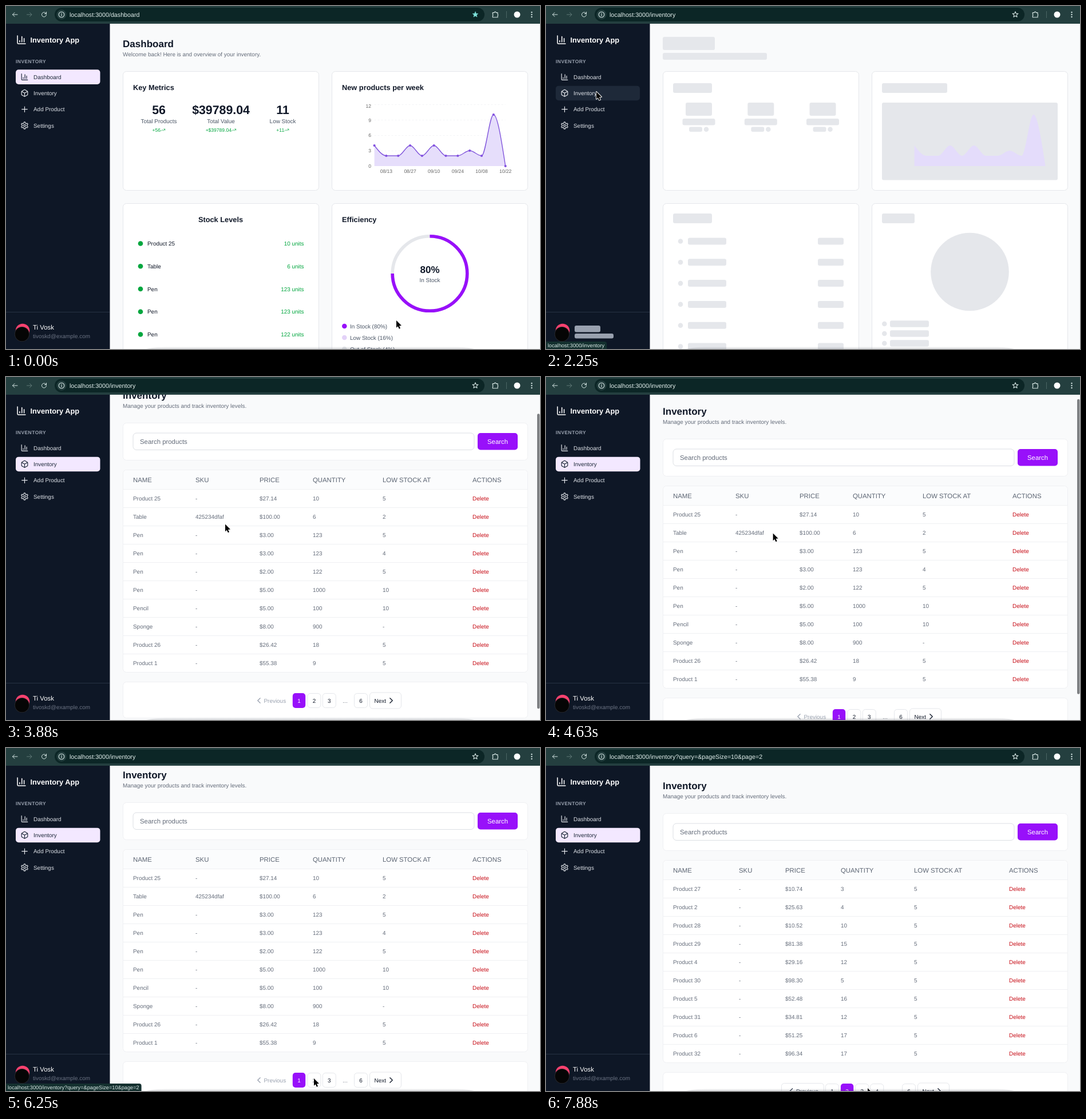
These frames come from a looping animation (933 px wide and 600 px high, 8 s). An HTML page with a canvas:

```html
<!DOCTYPE html>
<html lang="en">
<head>
<meta charset="utf-8">
<title>Inventory App</title>
<style>
html, body { margin: 0; width: 100%; height: 100%; overflow: hidden; background: #f9fafb; }
canvas { display: block; width: 933px; height: 600px; }
</style>
</head>
<body>
<canvas id="stage"></canvas>
<script>
const W = 933, H = 600, LOOP = 8000, STEP = 125;
const canvas = document.getElementById('stage');
const g = canvas.getContext('2d');
const dpr = window.devicePixelRatio || 1;
canvas.width = W * dpr;
canvas.height = H * dpr;
g.textRendering = 'geometricPrecision';

const INK = '#101828', GRAY = '#646c7a', LINE = '#e5e7eb', FAINT = '#eff0f3', BONE = '#e5e7eb';
const PURPLE = '#9810fa', GREEN = '#00a63e', RED = '#c60a14';
const SM = 9.94, XS = 8.52, MD = 11.36, LG = 12.8, XL = 17.05, XXL = 21.3;

// Moments of hard changes, in ms
const T = { hover: 1250, status: 1375, load: 1750, list: 2625, leave: 2750,
  link: 6250, page2: 6750, unlink: 7500 };

const pointer = [[0, 682, 550], [125, 575, 362], [250, 473, 213], [375, 473, 213],
  [1250, 88, 150], [2625, 88, 150], [3125, 368, 225], [3875, 383, 257.5], [4500, 392, 266],
  [5500, 500, 439], [6250, 538, 578], [6750, 541, 578], [7000, 547, 576],
  [7500, 547, 576], [7875, 562, 595]];
const scrollKeys = [[3250, 0], [3875, 34], [4125, 34], [4750, 3], [5375, 19], [6750, 19], [6751, 0]];

const ICONS = {
  chart: new Path2D('M3 3v16a2 2 0 0 0 2 2h16M18 17V9M13 17V5M8 17v-3'),
  box: new Path2D('M21 8a2 2 0 0 0-1-1.73l-7-4a2 2 0 0 0-2 0l-7 4A2 2 0 0 0 3 8v8a2 2 0 0 0 1 1.73l7 4a2 2 0 0 0 2 0l7-4A2 2 0 0 0 21 16ZM3.3 7l8.7 5 8.7-5M12 22V12'),
  plus: new Path2D('M4 12h16M12 4v16'),
  gear: gearPath(),
  trend: new Path2D('M22 7l-8.5 8.5-5-5L2 17M16 7h6v6'),
  left: new Path2D('M15 4l-8 8 8 8'),
  right: new Path2D('M9 4l8 8-8 8'),
  back: new Path2D('M21 12H4M11 5l-7 7 7 7'),
  forward: new Path2D('M3 12h17M13 5l7 7-7 7'),
  reload: new Path2D('M20 12a8 8 0 1 1-2.5-5.8L20 9M20 3v6h-6'),
  puzzle: new Path2D('M4 7h5a2.5 2.5 0 0 1 5 0h5v5a2.5 2.5 0 0 1 0 4v5H4v-5a2.5 2.5 0 0 0 0-4z'),
  star: starPath()
};
const NAV = [['Dashboard', 'chart'], ['Inventory', 'box'], ['Add Product', 'plus'], ['Settings', 'gear']];

const HEAD = ['NAME', 'SKU', 'PRICE', 'QUANTITY', 'LOW STOCK AT', 'ACTIONS'];
const PAGES = [
  { cols: [222, 331, 443, 536, 658, 815],
    rows: ['Product 25|-|$27.14|10|5', 'Table|425234dfaf|$100.00|6|2', 'Pen|-|$3.00|123|5',
      'Pen|-|$3.00|123|4', 'Pen|-|$2.00|122|5', 'Pen|-|$5.00|1000|10', 'Pencil|-|$5.00|100|10',
      'Sponge|-|$8.00|900|-', 'Product 26|-|$26.42|18|5', 'Product 1|-|$55.38|9|5'] },
  { cols: [222, 337, 418, 515, 643, 809],
    rows: ['Product 27|-|$10.74|3|5', 'Product 2|-|$25.63|4|5', 'Product 28|-|$10.52|10|5',
      'Product 29|-|$81.38|15|5', 'Product 4|-|$29.16|12|5', 'Product 30|-|$98.30|5|5',
      'Product 5|-|$52.48|16|5', 'Product 31|-|$34.81|12|5', 'Product 6|-|$51.25|17|5',
      'Product 32|-|$96.34|17|5'] }
];

function gearPath() {
  const p = new Path2D();
  for (let i = 0; i <= 96; i++) {
    const a = i / 96 * Math.PI * 2;
    const r = 8.7 + 1.7 * Math.tanh(2 * Math.cos(6 * a));
    p.lineTo(12 + r * Math.sin(a), 12 - r * Math.cos(a));
  }
  p.closePath();
  p.moveTo(15, 12);
  p.arc(12, 12, 3, 0, Math.PI * 2);
  return p;
}

function starPath() {
  const p = new Path2D();
  for (let i = 0; i < 10; i++) {
    const a = i * Math.PI / 5, r = i % 2 ? 4.4 : 10;
    p.lineTo(12 + r * Math.sin(a), 12 - r * Math.cos(a));
  }
  p.closePath();
  return p;
}

function track(keys, t) {
  if (t <= keys[0][0]) return keys[0].slice(1);
  for (let i = 1; i < keys.length; i++) {
    const a = keys[i - 1], b = keys[i];
    if (t <= b[0]) {
      const u = (t - a[0]) / (b[0] - a[0]), e = u * u * (3 - 2 * u);
      return a.slice(1).map((v, k) => v + (b[k + 1] - v) * e);
    }
  }
  return keys[keys.length - 1].slice(1);
}

// y is the middle of the capitals
function text(s, x, y, size, color, { bold = false, align = 'left', gap = 0 } = {}) {
  g.font = (bold ? 'bold ' : '') + size + 'px "Liberation Sans", Arial, sans-serif';
  g.textAlign = align;
  g.letterSpacing = gap + 'px';
  g.fillStyle = color;
  g.fillText(s, x, y + size * 0.355);
}

function rect(x, y, w, h, r, fill, stroke) {
  g.beginPath();
  g.roundRect(x, y, w, h, r);
  if (fill) { g.fillStyle = fill; g.fill(); }
  if (stroke) { g.strokeStyle = stroke; g.lineWidth = 1; g.stroke(); }
}

function dot(x, y, r, fill) {
  g.beginPath();
  g.arc(x, y, r, 0, Math.PI * 2);
  g.fillStyle = fill;
  g.fill();
}

function line(x1, y1, x2, y2, color, width = 1) {
  g.beginPath();
  g.moveTo(x1, y1);
  g.lineTo(x2, y2);
  g.strokeStyle = color;
  g.lineWidth = width;
  g.stroke();
}

function icon(name, cx, cy, size, color, { weight = 2, filled = false } = {}) {
  g.save();
  g.translate(cx - size / 2, cy - size / 2);
  g.scale(size / 24, size / 24);
  g.lineWidth = weight;
  g.lineCap = g.lineJoin = 'round';
  g.strokeStyle = g.fillStyle = color;
  if (filled) g.fill(ICONS[name]);
  g.stroke(ICONS[name]);
  g.restore();
}

const card = (x, y, w, h, edge = LINE) => rect(x, y, w, h, 6, '#fff', edge);
const bone = (x1, y1, x2, y2, color = BONE) => rect(x1, y1, x2 - x1, y2 - y1, 3, color);

function toolbar(t) {
  g.fillStyle = '#243f3f';
  g.fillRect(0, 0, W, 31);
  rect(85, 3, 751, 24, 12, '#0c2626');
  const ink = '#d5e5e3';
  icon('back', 15.5, 15, 12, ink);
  icon('forward', 41, 15, 12, '#5f7876');
  icon('reload', 66.5, 15, 12, ink);
  dot(97, 15, 8.5, '#243f3f');
  g.beginPath();
  g.arc(97, 15, 4.8, 0, Math.PI * 2);
  g.strokeStyle = ink;
  g.lineWidth = 1.1;
  g.stroke();
  line(97, 14.3, 97, 17.6, ink, 1.2);
  line(97, 12.2, 97, 13.4, ink, 1.2);
  const path = t < T.load ? 'dashboard' : t < T.page2 ? 'inventory' : 'inventory?query=&pageSize=10&page=2';
  text('localhost:3000/' + path, 111, 15, 10.7, '#e3efed');
  if (t < T.load) icon('star', 820, 15, 12.5, '#7fe3dc', { filled: true, weight: 1 });
  else icon('star', 820, 15, 12.5, ink);
  icon('puzzle', 855, 14.5, 14, ink);
  line(874.5, 9, 874.5, 21, '#4a6664');
  dot(893, 15, 5.5, '#fff');
  for (const y of [11, 15, 19]) dot(918.5, y, 1.2, ink);
}

function sidebar(t) {
  g.fillStyle = '#0e1726';
  g.fillRect(0, 31, 181.5, H);
  icon('chart', 27, 59, 18.5, '#fff');
  text('Inventory App', 42.5, 59, LG, '#fff', { bold: true });
  text('INVENTORY', 17, 97, XS, '#99a1af', { bold: true, gap: 0.43 });
  const loading = t >= T.load && t < T.list;
  const active = t < T.load ? 0 : t < T.list ? -1 : 1;
  NAV.forEach(([label, name], i) => {
    const y = 124 + 28.35 * i, on = i === active;
    if (on) rect(17, y - 12.7, 147.5, 25.6, 5, '#f3e8ff');
    else if (i === 1 && t >= T.hover && t < T.list) rect(17, y - 12.7, 147, 25.6, 5, '#1e2939');
    icon(name, 32.5, y, 14.2, on ? '#1e2939' : '#e2e5ea');
    text(label, 48, y, SM, on ? '#1e2939' : '#dde1e7');
  });
  line(0, 535.5, 181, 535.5, '#283244');
  dot(29, 568, 12.3, '#f7416f');
  dot(28, 574, 13, '#2b2b2f');
  dot(28, 574, 12.2, '#050505');
  if (loading) {
    bone(50, 559, 95, 570.5, '#99a1af');
    bone(50, 573, 118, 581.5, '#99a1af');
  } else {
    text('Ti Vosk', 47, 562, MD, '#fff');
    text('tivoskd@example.com', 47, 577, SM, '#6a7282');
  }
}

function areaPath(close) {
  const data = [4, 2, 2, 4, 2, 4, 2, 2, 3, 2, 10, 0];
  const n = data.length - 1, dx = 20.82;
  const X = i => 643.6 + dx * i, Y = v => 280 - 9 * v;
  // Monotone curve: level at inner points, steeper at both ends
  const slope = i => i === 0 ? 1.5 * (Y(data[1]) - Y(data[0]))
    : i === n ? 1.5 * (Y(data[n]) - Y(data[n - 1])) : 0;
  g.beginPath();
  g.moveTo(X(0), Y(data[0]));
  for (let i = 0; i < n; i++) {
    g.bezierCurveTo(X(i) + dx / 3, Y(data[i]) + slope(i) / 3,
      X(i + 1) - dx / 3, Y(data[i + 1]) - slope(i + 1) / 3, X(i + 1), Y(data[i + 1]));
  }
  if (close) {
    g.lineTo(X(n), 280);
    g.lineTo(X(0), 280);
    g.closePath();
  }
  return data.map((v, i) => [X(i), Y(v)]);
}

function chart() {
  g.setLineDash([3, 3]);
  for (const y of [172.5, 199.5, 226.5, 253.5]) line(643.5, y, 872.5, y, '#f3f4f6');
  g.setLineDash([]);
  [[12, 175], [9, 199.5], [6, 226], [3, 253], [0, 280]].forEach(([v, y]) =>
    text(String(v), 638, y, XS, '#666', { align: 'right' }));
  ['08/13', '08/27', '09/10', '09/24', '10/08', '10/22'].forEach((s, i) =>
    text(s, 664.4 + 41.64 * i, 289, XS, '#666', { align: 'center' }));
  areaPath(true);
  g.fillStyle = '#e6defb';
  g.fill();
  const pts = areaPath(false);
  g.strokeStyle = '#8257dc';
  g.lineWidth = 1.4;
  g.stroke();
  for (const [x, y] of pts) dot(x, y, 2.1, '#8250e0');
}

function cards() {
  card(204.5, 114.5, 342, 208);
  card(569.5, 114.5, 342, 208);
  card(204.5, 345.5, 342, 300);
  card(569.5, 345.5, 342, 300);
}

function dashboard() {
  text('Dashboard', 204, 66, XL, INK, { bold: true });
  text('Welcome back! Here is and overview of your inventory.', 204, 84.5, SM, GRAY);
  cards();
  text('Key Metrics', 222, 142, LG, INK, { bold: true });
  [['56', 'Total Products', '+56', 267], ['$39789.04', 'Total Value', '+$39789.04', 375.5],
    ['11', 'Low Stock', '+11', 483.5]].forEach(([value, label, delta, x]) => {
    text(value, x, 181.5, XXL, INK, { bold: true, align: 'center' });
    text(label, x, 201.5, SM, '#4a5565', { align: 'center' });
    text(delta, x - 4.25, 217, XS, GREEN, { align: 'center' });
    icon('trend', x + g.measureText(delta).width / 2, 217, 8.5, GREEN);
  });
  text('New products per week', 587, 142, LG, INK, { bold: true });
  chart();

  text('Stock Levels', 375, 373, LG, INK, { bold: true, align: 'center' });
  ['Product 25|10', 'Table|6', 'Pen|123', 'Pen|123', 'Pen|122'].forEach((row, i) => {
    const [name, n] = row.split('|'), y = 415.5 + 39.75 * i;
    dot(235, y, 4.3, GREEN);
    text(name, 247, y, SM, INK);
    text(n + ' units', 520.5, y, SM, GREEN, { align: 'right' });
  });

  text('Efficiency', 587, 373, LG, INK, { bold: true });
  const top = -Math.PI / 2;
  [[LINE, 2], [PURPLE, 1.5]].forEach(([color, turn]) => {
    g.beginPath();
    g.arc(740.5, 468, 65.3, top, top + turn * Math.PI);
    g.strokeStyle = color;
    g.lineWidth = 5.6;
    g.stroke();
  });
  text('80%', 740.5, 461, XL, INK, { bold: true, align: 'center' });
  text('In Stock', 740.5, 479.5, SM, '#4a5565', { align: 'center' });
  [['In Stock (80%)', PURPLE], ['Low Stock (16%)', '#e3d2f8'], ['Out of Stock (4%)', LINE]].forEach(([s, color], i) => {
    dot(591.3, 560 + 20 * i, 4.3, color);
    text(s, 601, 560 + 20 * i, SM, '#4a5565');
  });
}

function skeleton() {
  bone(204, 54, 295, 77);
  bone(204, 82, 386, 94);
  cards();
  bone(222, 135, 290, 152);
  bone(587, 135, 701, 152);
  for (const x of [267, 375.3, 483.5]) {
    bone(x - 23, 169, x + 23, 192);
    bone(x - 28.5, 197, x + 28.5, 208.5);
    bone(x - 17, 211.5, x + 6, 220);
    dot(x + 13, 215.8, 4.3, BONE);
  }
  bone(587, 169, 894, 304.5);
  areaPath(true);
  g.fillStyle = '#e4dcfb';
  g.fill();
  bone(222, 363, 290, 380);
  bone(587, 363, 644, 380);
  for (let i = 0; i < 6; i++) {
    const y = 411.5 + 36.8 * i;
    dot(235, y, 4.3, BONE);
    bone(248, y - 6, 315, y + 6);
    bone(475, y - 6, 520, y + 6);
  }
  dot(740.5, 465, 68.3, BONE);
  for (let i = 0; i < 3; i++) {
    const y = 556 + 17 * i;
    dot(591.3, y, 4.3, BONE);
    bone(601, y - 5.7, 669, y + 5.7);
  }
}

function pager(second) {
  const y = 600;
  const dx = second ? -13.5 : 0;
  const prev = second ? '#364153' : '#99a1af';
  const button = (s, x, on) => {
    if (on) rect(x - 11.2, y - 13, 22.4, 26, 5, PURPLE);
    else rect(x - 11.5, y - 12.5, 23, 25, 5, '#fff', LINE);
    text(s, x, y, SM, on ? '#fff' : INK, { align: 'center' });
  };
  if (second) rect(411.5, y - 13.5, 74, 28, 5, '#fff', LINE);
  icon('left', 442.5 + dx, y, 13, prev, { weight: 2.4 });
  text('Previous', 450.5 + dx, y, SM, prev);
  const labels = second ? ['1', '2', '3', '4'] : ['1', '2', '3'];
  labels.forEach((s, i) => button(s, (second ? 500 : 512) + (second ? 26.1 : 26.4) * i, i === (second ? 1 : 0)));
  const end = second ? 14 : 0;
  text('...', 592.5 + end, y, SM, GRAY, { align: 'center' });
  button('6', 620 + end, false);
  rect(635.5 + end, y - 14, 55, 28, 5, '#fff', LINE);
  text('Next', 643.5 + end, y, SM, INK);
  icon('right', 672.5 + end, y, 13, INK, { weight: 2.4 });
}

function inventory(t) {
  const second = t >= T.page2, { cols, rows } = PAGES[second ? 1 : 0];
  text('Inventory', 204, 66, XL, INK, { bold: true });
  text('Manage your products and track inventory levels.', 204, 84.5, SM, GRAY);
  card(204.5, 114.5, 707, 65, FAINT);
  rect(222, 132, 596, 29.5, 6, '#fff', '#dcdfe4');
  text('Search products', 234, 147, MD, GRAY);
  rect(824, 132, 70, 29.5, 5, PURPLE);
  text('Search', 859, 147, MD, '#fff', { align: 'center' });

  card(204.5, 196.5, 707, 354, FAINT);
  rect(205, 197, 706, 33, [6, 6, 0, 0], '#fbfcfd');
  HEAD.forEach((s, i) => text(s, cols[i], 214, MD, '#5b6472'));
  rows.forEach((row, i) => {
    const y = 246.5 + 32 * i;
    line(205, y - 16, 911, y - 16, FAINT);
    row.split('|').forEach((s, k) => text(s, cols[k], y, SM, GRAY));
    text('Delete', cols[5], y, SM, RED);
  });
  card(204.5, 567.5, 707, 63, FAINT);
  pager(second);
}

function scrollbar(t, scroll) {
  const fade = (from, to) => t < from ? 0 : Math.max(0, Math.min(1, (to - t) / 250));
  const alpha = t < T.page2 ? fade(3375, 6125) : fade(T.page2, 7625);
  if (!alpha) return;
  g.globalAlpha = alpha;
  rect(928, 33 + 0.92 * scroll, 4.5, 516, 2.2, '#7d7f82');
  g.globalAlpha = 1;
}

function status(t) {
  let s = '';
  if (t >= T.status && t < T.leave) s = 'localhost:3000/inventory';
  else if (t >= T.link && t < T.unlink) s = 'localhost:3000/inventory?query=&pageSize=10&page=2';
  if (!s) return;
  g.font = '9.2px "Liberation Sans", Arial, sans-serif';
  g.letterSpacing = '0px';
  rect(-4, 587, g.measureText(s).width + 11, 20, [0, 4, 0, 0], '#14302f');
  text(s, 3, 594, 9.2, '#dcebe9');
}

// Soft shadow along the bottom edge
function shade() {
  const fade = g.createLinearGradient(0, 595.5, 0, 600);
  fade.addColorStop(0, 'rgba(70,75,85,0)');
  fade.addColorStop(1, 'rgba(70,75,85,.2)');
  g.fillStyle = fade;
  g.beginPath();
  g.moveTo(245, 600);
  g.quadraticCurveTo(265, 595.5, 300, 595.5);
  g.lineTo(770, 595.5);
  g.quadraticCurveTo(800, 595.5, 818, 600);
  g.fill();
}

function cursor(x, y) {
  g.save();
  g.translate(x, y);
  g.beginPath();
  [[0, 0], [0, 12.8], [2.8, 10.2], [4.9, 14.7], [7, 13.8], [5, 9.4], [9, 9]].forEach(p => g.lineTo(...p));
  g.closePath();
  g.lineJoin = 'round';
  g.strokeStyle = '#fff';
  g.lineWidth = 1.8;
  g.stroke();
  g.fillStyle = '#000';
  g.fill();
  g.restore();
}

function draw(t) {
  g.setTransform(dpr, 0, 0, dpr, 0, 0);
  g.fillStyle = '#f9fafb';
  g.fillRect(0, 0, W, H);
  const [scroll] = track(scrollKeys, t);
  g.save();
  g.translate(0, -Math.round(scroll));
  if (t < T.load) dashboard();
  else if (t < T.list) skeleton();
  else inventory(t);
  g.restore();
  scrollbar(t, scroll);
  shade();
  sidebar(t);
  toolbar(t);
  status(t);
  cursor(...track(pointer, t));
}

const start = performance.now();
function frame() {
  const t = (performance.now() - start) % LOOP;
  draw(Math.floor(t / STEP) * STEP);
  requestAnimationFrame(frame);
}
frame();
</script>
</body>
</html>
```
